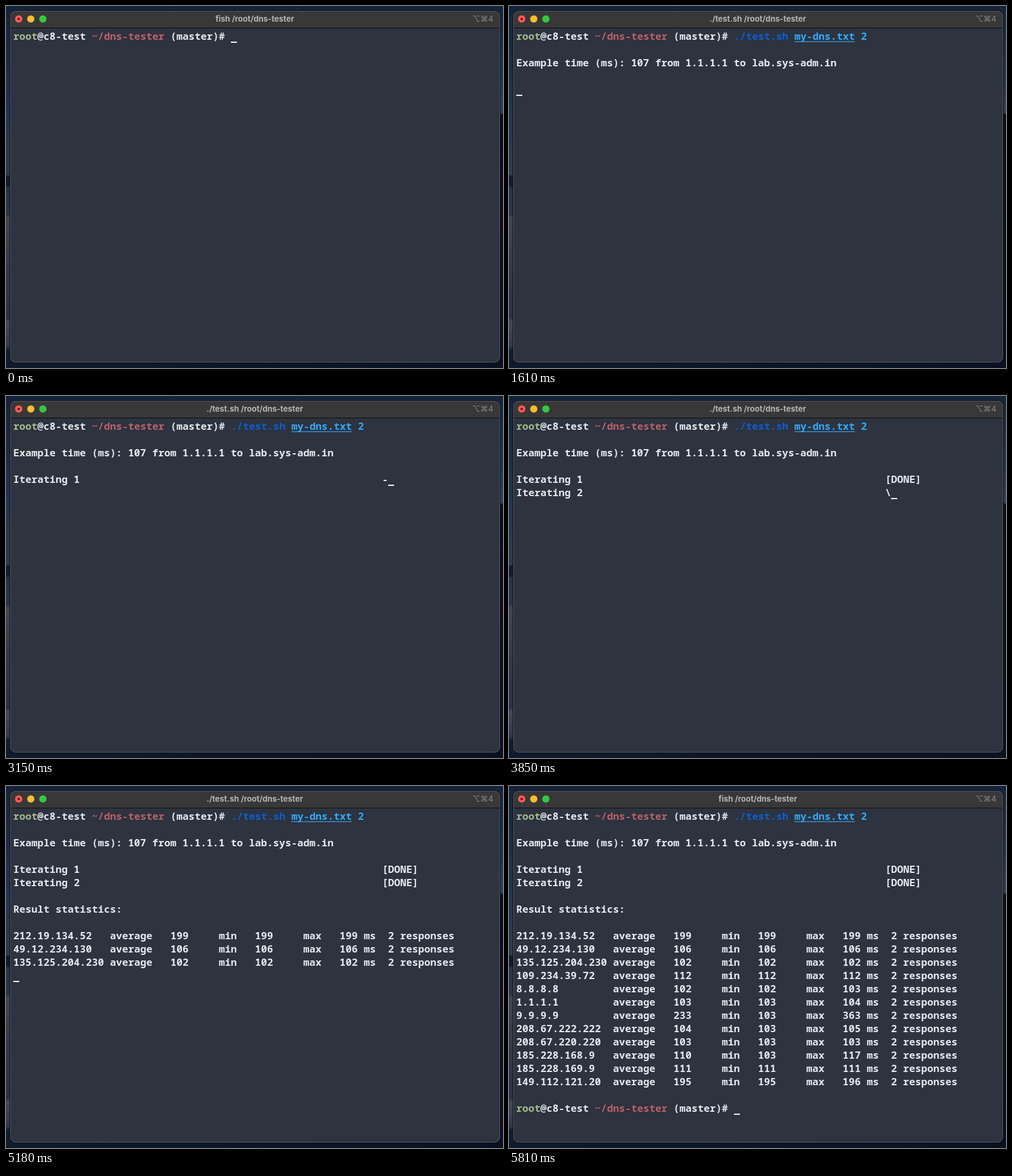
Recreate the animation shown at these times as an HTML page. Size 822 by 600 pixels, loop 5880 ms.

```html
<!DOCTYPE html>
<html lang="en">
<head>
<meta charset="utf-8">
<title>dns-tester</title>
<style>
  html, body { margin: 0; width: 100%; height: 100%; overflow: hidden; background: #111c30; }
  svg { display: block; width: 822px; height: 600px; }
  .term { font: 600 16.667px "Noto Sans Mono", "DejaVu Sans Mono", monospace; fill: #e5e9f0; font-variant-ligatures: none; }
  .term text { white-space: pre; }
  .bar { font: 700 13px Inter, "DejaVu Sans", sans-serif; fill: #b6b6b7; }
  .key { font-weight: 500; fill: #7d7d7e; }
  .user { fill: #a5bd8d; }
  .path { fill: #bd616b; }
  .cmd { fill: #0b5fd3; }
  .arg { fill: #34aafc; }
</style>
</head>
<body>
<svg viewBox="0 0 822 600">
  <defs>
    <linearGradient id="left" x2="0" y2="1">
      <stop offset="0" stop-color="#16253d"/>
      <stop offset=".3" stop-color="#20364f"/>
      <stop offset=".46" stop-color="#2a3b50"/>
      <stop offset=".462" stop-color="#121b2d"/>
      <stop offset=".49" stop-color="#121b2d"/>
      <stop offset=".495" stop-color="#263246"/>
      <stop offset=".57" stop-color="#2b3446"/>
      <stop offset=".58" stop-color="#414653"/>
      <stop offset=".7" stop-color="#353a48"/>
      <stop offset=".86" stop-color="#2a3040"/>
      <stop offset=".87" stop-color="#444957"/>
      <stop offset=".94" stop-color="#303748"/>
      <stop offset=".95" stop-color="#121d33"/>
      <stop offset="1" stop-color="#101b30"/>
    </linearGradient>
    <linearGradient id="right" x2="0" y2="1">
      <stop offset="0" stop-color="#16243b"/>
      <stop offset=".2" stop-color="#24364b"/>
      <stop offset=".295" stop-color="#33424f"/>
      <stop offset=".3" stop-color="#0b0d18"/>
      <stop offset="1" stop-color="#0a1120"/>
    </linearGradient>
    <linearGradient id="floor">
      <stop offset="0" stop-color="#0f1a2e"/>
      <stop offset="1" stop-color="#0a1222"/>
    </linearGradient>
    <clipPath id="win"><rect x="7" y="8" width="810" height="583" rx="9"/></clipPath>
  </defs>

  <rect width="822" height="600" fill="#15233a"/>
  <rect y="8" width="12" height="592" fill="url(#left)"/>
  <rect x="808" width="14" height="600" fill="url(#right)"/>
  <rect y="590" width="822" height="10" fill="url(#floor)"/>
  <g fill="#5b6778"><rect x="277" y="4" width="1" height="1"/><rect x="481" y="4" width="1" height="1"/></g>

  <rect x="6" y="7" width="812" height="585" rx="10" fill="#090d15"/>
  <g clip-path="url(#win)">
    <rect x="7" y="8" width="810" height="583" fill="#2d333f"/>
    <rect x="7" y="8" width="810" height="28" fill="#383839"/>
    <rect x="7" y="36" width="810" height="1" fill="#0c0d10"/>
  </g>
  <rect x="7.5" y="8.5" width="809" height="582" rx="8.5" fill="none" stroke="#6a6e76" stroke-opacity=".65"/>

  <circle cx="21" cy="21.5" r="6" fill="#fc5b57"/>
  <circle cx="21" cy="21.5" r="2" fill="#6d0d0b"/>
  <circle cx="41" cy="21.5" r="6" fill="#fdbc2d"/>
  <circle cx="61" cy="21.5" r="6" fill="#35c840"/>
  <text id="title" class="bar" x="411.5" y="26" text-anchor="middle"></text>
  <text class="bar key" x="806" y="25.5" text-anchor="end">⌥⌘4</text>

  <g id="screen" class="term"></g>
  <rect id="cursor" width="10" height="2" fill="#f2f4f8"/>
</svg>

<script>
const NS = 'http://www.w3.org/2000/svg';
const TICK = 70, LOOP = 5880;
const byId = id => document.getElementById(id);
const screen = byId('screen'), cursor = byId('cursor'), title = byId('title');
const colX = col => 12 + col * 10;
const baseY = row => 56 + row * 22;
const timed = [];

function add(tag, attrs, from, to = Infinity) {
  const el = document.createElementNS(NS, tag);
  for (const k in attrs) el.setAttribute(k, attrs[k]);
  screen.append(el);
  timed.push({ el, from, to });
  return el;
}

function print(row, col, text, from, to, cls = '') {
  const el = add('text', { x: colX(col), y: baseY(row), class: cls }, from, to);
  el.textContent = text;
  return el;
}

function prompt(row, from) {
  print(row, 0, 'root', from, undefined, 'user');
  print(row, 4, '@c8-test', from);
  print(row, 13, '~/dns-tester', from, undefined, 'path');
  print(row, 26, '(master)#', from);
}

prompt(0, 0);
print(0, 36, './test.sh', 9, undefined, 'cmd');
print(0, 46, 'my-dns.txt', 9, undefined, 'arg');
add('rect', { x: colX(46), y: 58.5, width: 100, height: 1.2, class: 'arg' }, 9);
print(0, 57, '2', 9, undefined, 'arg');
print(2, 0, 'Example time (ms): 107 from 1.1.1.1 to lab.sys-adm.in', 23);

// Ticks on which the spinner holds its last glyph
const holds = new Set([25, 27, 30, 35, 38, 40, 43, 46, 49, 53, 56, 58, 61, 64, 67, 69, 72]);
const spinners = [];
function iteration(n, row, start, done) {
  print(row, 0, 'Iterating ' + n, start);
  spinners.push({ el: print(row, 61, '|', start, done), start });
  print(row, 61, '[DONE]', done);
}
iteration(1, 4, 24, 50);
iteration(2, 5, 51, 73);

print(7, 0, 'Result statistics:', 74);
const results = [
  ['212.19.134.52', 199, 199, 199], ['49.12.234.130', 106, 106, 106],
  ['135.125.204.230', 102, 102, 102], ['109.234.39.72', 112, 112, 112],
  ['8.8.8.8', 102, 102, 103], ['1.1.1.1', 103, 103, 104],
  ['9.9.9.9', 233, 103, 363], ['208.67.222.222', 104, 103, 105],
  ['208.67.220.220', 103, 103, 103], ['185.228.168.9', 110, 103, 117],
  ['185.228.169.9', 111, 111, 111], ['149.112.121.20', 195, 195, 196]
];
results.forEach(([ip, avg, min, max], i) => {
  const row = 9 + i;
  const from = i < 3 ? 74 : i < 7 ? 75 : i < 11 ? 76 : 77;
  print(row, 0, ip, i === 7 ? 75 : from);
  print(row, 16, `average   ${avg}     min   ${min}     max   ${max} ms  2 responses`, from);
});
prompt(22, 77);

// [tick, column, row]; no position means hidden
const cursorPath = [
  [0, 36, 0], [3], [15, 58, 0], [21, 0, 2], [23, 0, 4], [24, 62, 4], [33], [40, 62, 4], [48],
  [51, 62, 5], [62], [70, 62, 5], [73, 0, 6], [74, 0, 12], [75, 16, 16],
  [76, 0, 20], [77, 36, 22]
];

function spin(start, tick) {
  let steps = 0;
  for (let i = start + 1; i <= tick; i++) if (!holds.has(i)) steps++;
  return '|/-\\'[steps % 4];
}

function draw(tick) {
  for (const { el, from, to } of timed)
    el.setAttribute('visibility', tick >= from && tick < to ? 'visible' : 'hidden');
  for (const { el, start } of spinners) el.textContent = spin(start, tick);
  title.textContent = (tick >= 21 && tick < 78 ? './test.sh' : 'fish') + ' /root/dns-tester';

  const [, col, row] = cursorPath.filter(p => p[0] <= tick).pop();
  const on = col !== undefined;
  cursor.setAttribute('visibility', on ? 'visible' : 'hidden');
  if (on) {
    cursor.setAttribute('x', colX(col));
    cursor.setAttribute('y', baseY(row) + 3);
  }
}

const t0 = performance.now();
let last = -1;
function loop() {
  const tick = Math.floor((performance.now() - t0) % LOOP / TICK);
  if (tick !== last) draw(last = tick);
  requestAnimationFrame(loop);
}
loop();
</script>
</body>
</html>
```
